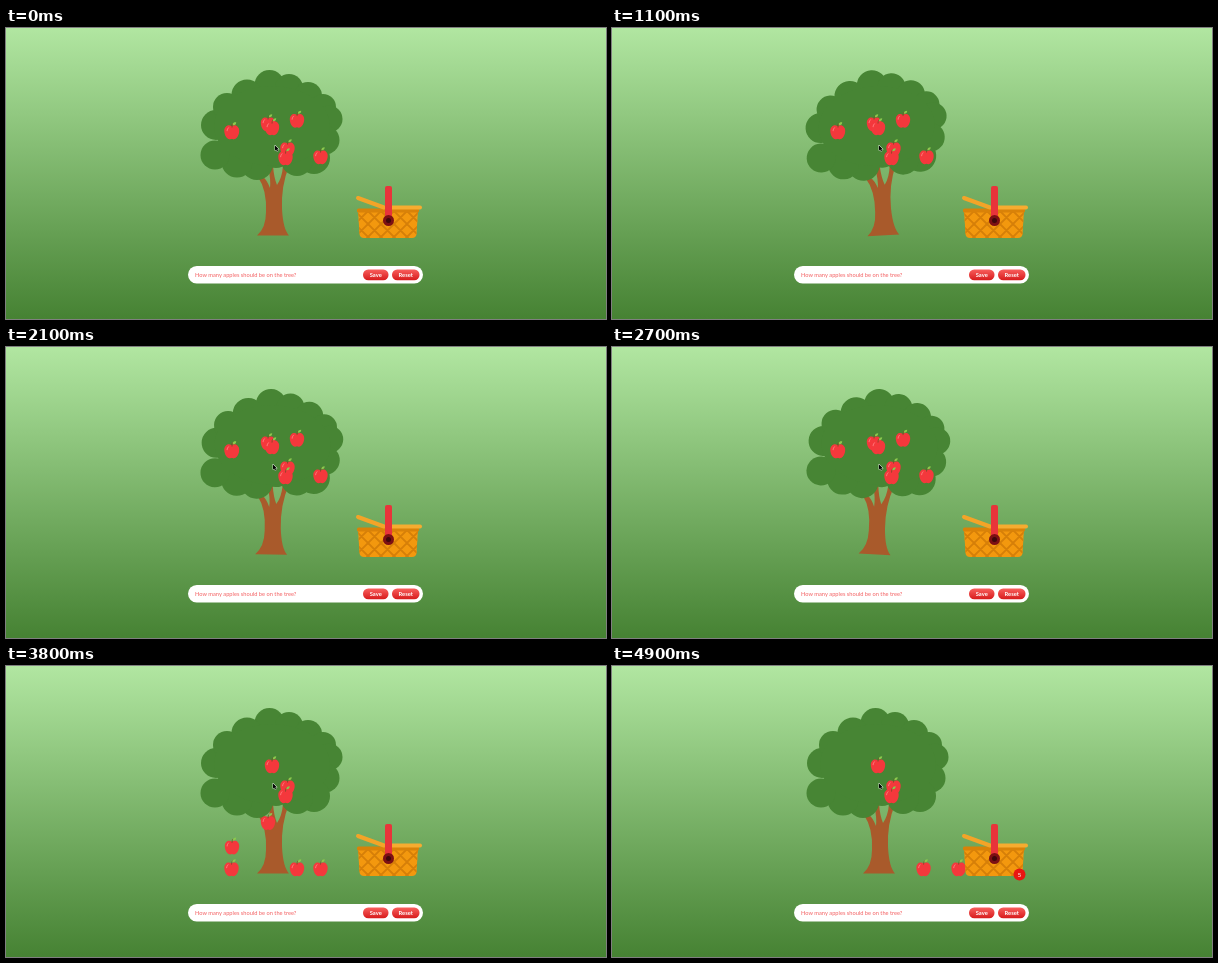
An HTML page with a canvas that plays this animation: 600x291 px, repeating every 5000 ms.

```html
<!DOCTYPE html>
<html lang="en">
<head>
<meta charset="utf-8">
<title>Apple tree</title>
<style>
html, body { margin: 0; width: 100%; height: 100%; overflow: hidden; background: #7cb469; }
canvas { display: block; width: 100%; height: 100%; }
</style>
</head>
<body>
<canvas id="stage" width="600" height="291"></canvas>
<script>
const ctx = document.getElementById('stage').getContext('2d');
const LOOP = 5000, GROUND = 203, BASKET_X = 382;
const SHAKE = { start: 400, length: 3000, angle: 3.1 };
const FALL_MS = 300, ROLL_MS = 500;

// x, y, radius of the leaf clusters
const LEAVES = [
  [263.5, 57, 15], [283, 60, 14], [302, 68, 14], [317, 79, 13], [323, 91, 13.5],
  [319, 112, 14.5], [308, 130, 16], [291, 132, 16], [270, 124, 16], [251, 136, 16],
  [231, 134, 15.5], [209, 127, 14.5], [210, 97, 15], [221, 79, 14], [241, 67, 15.5]
];

// Painted in this order; fall and roll are start times in ms
const APPLES = [
  { x: 225.5, y: 104, fall: 3480, roll: 4560 },
  { x: 226, y: 104, fall: 3536, roll: 4665 },
  { x: 262, y: 96, fall: 3575, roll: 4775 },
  { x: 266, y: 100 },
  { x: 291, y: 92.5, fall: 3440, roll: 4480 },
  { x: 281.5, y: 121 },
  { x: 279.5, y: 130 },
  { x: 314.5, y: 129, fall: 3410, roll: 4420 }
];

const clamp = v => Math.max(0, Math.min(1, v));
const fallEase = p => p * p;

function bezier(x1, y1, x2, y2) {
  const at = (a, b, s) => 3 * a * s * (1 - s) ** 2 + 3 * b * s * s * (1 - s) + s ** 3;
  return p => {
    let lo = 0, hi = 1;
    for (let i = 0; i < 20; i++) {
      const mid = (lo + hi) / 2;
      if (at(x1, x2, mid) < p) lo = mid; else hi = mid;
    }
    return at(y1, y2, lo);
  };
}
const rollEase = bezier(0.25, 0.1, 0.25, 1);

function vertical(y0, y1, from, to) {
  const g = ctx.createLinearGradient(0, y0, 0, y1);
  g.addColorStop(0, from);
  g.addColorStop(1, to);
  return g;
}

function disc(x, y, r, fill) {
  ctx.beginPath();
  ctx.arc(x, y, r, 0, Math.PI * 2);
  ctx.fillStyle = fill;
  ctx.fill();
}

function pill(x, y, w, h, r, fill) {
  ctx.beginPath();
  ctx.roundRect(x, y, w, h, r);
  ctx.fillStyle = fill;
  ctx.fill();
}

function shape(d, fill) {
  ctx.fillStyle = fill;
  ctx.fill(new Path2D(d));
}

function label(text, x, y, font, fill, align = 'center') {
  ctx.font = font + ' Lato, sans-serif';
  ctx.textAlign = align;
  ctx.textBaseline = 'middle';
  ctx.fillStyle = fill;
  ctx.fillText(text, x, y);
}

function drawTree(t) {
  const p = clamp((t - SHAKE.start) / SHAKE.length);
  const deg = -SHAKE.angle * Math.sin(p * Math.PI * 2);
  ctx.save();
  ctx.translate(266, 125);
  ctx.rotate(deg * Math.PI / 180);
  ctx.translate(-266, -125);
  shape('M251 207.5 Q260 200 260 184 Q261 162 252 149 L257 149 Q261 152 264 160' +
        'Q265 152 262 138 L267 138 Q268 150 271 157 Q276 150 277 138 L283 138' +
        'Q275 158 276 181 Q277 201 283 207.5 Z', '#a95a2b');
  const green = '#478534';
  LEAVES.forEach(([x, y, r]) => disc(x, y, r, green));
  ctx.beginPath();
  ctx.ellipse(266, 98, 58, 40, 0, 0, Math.PI * 2);
  ctx.fill();
  ctx.restore();
}

function drawApple(x, y) {
  ctx.save();
  ctx.translate(x, y);
  shape('M0 -5.6 C3 -7.8 7.2 -6 7.2 -1.2 C7.2 3.4 4.2 7.4 1.8 7.2 Q0 6.5 -1.8 7.2' +
        'C-4.2 7.4 -7.2 3.4 -7.2 -1.2 C-7.2 -6 -3 -7.8 0 -5.6 Z', '#f4383c');
  shape('M-5.5 -1 Q-5 -4.5 -2.5 -4.7 Q-4.4 -3.4 -4.5 -0.8 Z', '#ff7375');
  ctx.strokeStyle = '#7c4a28';
  ctx.lineWidth = 0.8;
  ctx.beginPath();
  ctx.moveTo(0, -4.8);
  ctx.quadraticCurveTo(0, -7, 0.8, -8);
  ctx.stroke();
  shape('M0.8 -6.8 Q0.8 -9.8 4.2 -9.8 Q4.2 -6.6 0.8 -6.8 Z', '#8cc84e');
  ctx.restore();
}

function placeApple({ x, y, fall, roll }, t) {
  if (!fall) return drawApple(x, y);
  const down = fallEase(clamp((t - fall) / FALL_MS));
  const across = rollEase(clamp((t - roll) / ROLL_MS));
  if (across < 1) drawApple(x + (BASKET_X - x) * across, y + (GROUND - y) * down);
}

function drawBasket() {
  const body = new Path2D('M352 182 H412 L410.5 206 Q410 210 406 210 H358 Q354 210 353.5 206 Z');
  ctx.fillStyle = '#f3980e';
  ctx.fill(body);
  ctx.save();
  ctx.clip(body);
  ctx.strokeStyle = '#d67f08';
  ctx.lineWidth = 1.8;
  ctx.beginPath();
  for (let x = 322; x < 440; x += 13) {
    ctx.moveTo(x, 182);
    ctx.lineTo(x + 28, 210);
    ctx.moveTo(x + 28, 182);
    ctx.lineTo(x, 210);
  }
  ctx.stroke();
  ctx.restore();
  pill(351, 180.5, 62, 4, 1.5, '#d98208');
  pill(381, 177.5, 35, 4, 2, '#f6ac30');
  ctx.strokeStyle = '#f3a428';
  ctx.lineWidth = 4;
  ctx.lineCap = 'round';
  ctx.beginPath();
  ctx.moveTo(352, 170);
  ctx.lineTo(378, 179.5);
  ctx.stroke();
  pill(379, 158, 7, 35, 2, '#e8343a');
  disc(382.5, 192.5, 5.5, '#7c1014');
  disc(382.5, 192.5, 2.5, '#3f080b');
}

function drawBadge(t) {
  const count = APPLES.filter(a => t >= a.roll + 60).length;
  if (!count) return;
  disc(407.5, 208.5, 6, '#ea1512');
  label(count, 407.5, 208.8, '6.5px', '#fff');
}

function drawButton(text, x, w) {
  pill(x, 241.5, w, 10.8, 5.2, vertical(241, 252, '#fa6260', '#d81d1e'));
  label(text, x + w / 2, 247.2, 'bold 5.8px', '#fff');
}

function drawForm() {
  pill(182, 238, 235, 17.5, 8.75, '#fff');
  label('How many apples should be on the tree?', 189, 247, '5.7px', '#f35e60', 'left');
  drawButton('Save', 357, 25.5);
  drawButton('Reset', 386, 27.5);
}

function drawCursor(t) {
  ctx.save();
  ctx.translate(t < 150 ? 269 : 267, 117.5);
  const arrow = new Path2D('M0 0 V5 L1.2 4 L2.1 6 L3 5.6 L2.2 3.7 H3.7 Z');
  ctx.strokeStyle = '#dfe8db';
  ctx.lineWidth = 0.8;
  ctx.stroke(arrow);
  ctx.fillStyle = '#000';
  ctx.fill(arrow);
  ctx.restore();
}

function draw(t) {
  ctx.fillStyle = vertical(0, 291, '#b1e6a1', '#468233');
  ctx.fillRect(0, 0, 600, 291);
  drawTree(t);
  APPLES.forEach(a => placeApple(a, t));
  drawBasket();
  drawBadge(t);
  drawForm();
  drawCursor(t);
}

const began = performance.now();
function tick() {
  draw((performance.now() - began) % LOOP);
  requestAnimationFrame(tick);
}
tick();
</script>
</body>
</html>
```
